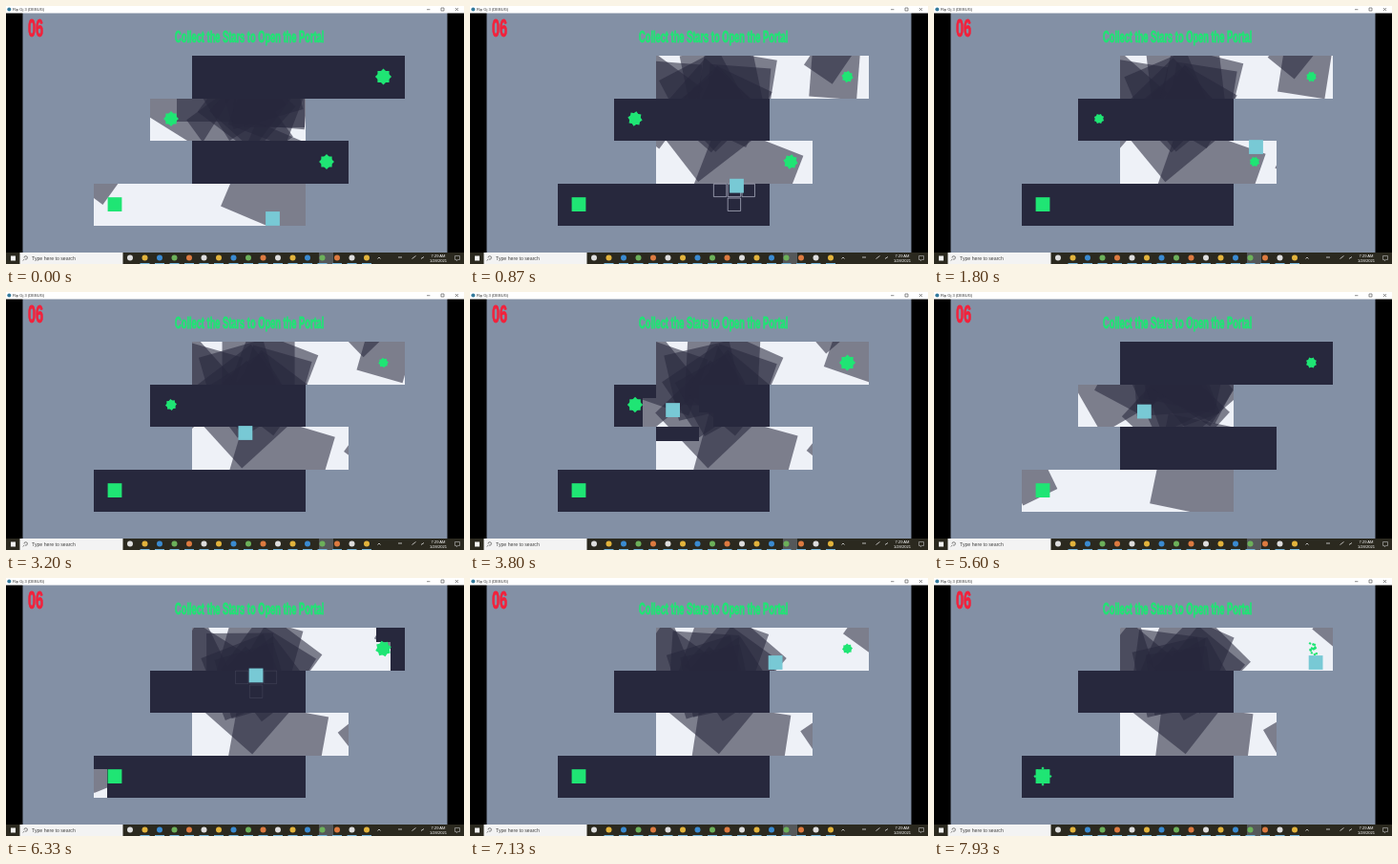
An HTML page with a canvas for the animation above (8000 ms loop, 480x270 px).

```html
<!DOCTYPE html>
<html lang="en">
<head>
<meta charset="utf-8">
<title>Portal game</title>
<style>
  html, body { margin: 0; width: 100%; height: 100%; overflow: hidden; background: #000; }
  canvas, svg { position: absolute; left: 0; top: 0; width: 480px; height: 270px; }
  text { font: 4.1px "Liberation Sans", Arial, sans-serif; }
  .hud text { font-weight: bold; stroke-width: .8px; }
</style>
</head>
<body>
<canvas id="game"></canvas>
<svg viewBox="0 0 480 270">
  <rect width="480" height="7.5" fill="#fff"/>
  <circle cx="3.3" cy="3.5" r="2" fill="#347b9c"/>
  <text x="7" y="5" fill="#333">Rip Gj 3 (DEBUG)</text>
  <path d="M441 3.7h3.4M456 2h3v3h-3zM471 2l3 3m0-3l-3 3" fill="none" stroke="#444" stroke-width=".6"/>
  <rect y="258" width="480" height="12" fill="#2b291f"/>
  <rect x="5" y="261.5" width="5" height="5" fill="#f4f4f4"/>
  <rect x="14.5" y="258" width="108" height="12" fill="#f3f3f3"/>
  <path d="M19.3 264.8l-1.5 1.7M19 263.5a1.7 1.7 0 1 1 1 1.5" fill="none" stroke="#333" stroke-width=".6"/>
  <text x="27" y="265.7" fill="#444" style="font-size:5.2px">Type here to search</text>
  <rect x="328" y="258" width="15" height="12" fill="#55585a"/>
  <g id="icons"></g>
  <path d="M389.5 264.5l1.5-1.5 1.5 1.5M411 263h4M425.5 264.500l4-3M435 264.500l3-2" fill="none" stroke="#ddd" stroke-width=".8"/>
  <g fill="#fff" text-anchor="middle">
    <text x="453" y="262.7">7:29 AM</text>
    <text x="453" y="268.3">1/28/2021</text>
  </g>
  <path d="M470.5 261.500h5v4h-2l-1.200 1.300v-1.300h-1.800z" fill="none" stroke="#aaa" stroke-width=".7"/>
  <g class="hud">
    <text fill="#f3213b" stroke="#f3213b" transform="translate(23 32) scale(.56 1)" style="font-size:26px">06</text>
    <text fill="#1fe574" stroke="#1fe574" transform="translate(177 37.500) scale(.56 1)" style="font-size:16.6px">Collect the Stars to Open the Portal</text>
  </g>
</svg>
<script>
const LOOP = 8000, CELL = 89 / 6, LEFT = 91.5, TOP = 52, WAVE_SPEED = 0.4;
const GREEN = '#1fe574', DARK = '#27283d', LIGHT = '#eef1f7', CYAN = '#78c9d5';
const PORTAL_OPENS = 7870;

const canvas = document.getElementById('game');
const ctx = canvas.getContext('2d');
const ratio = window.devicePixelRatio || 1;
canvas.width = 480 * ratio;
canvas.height = 270 * ratio;

// Taskbar buttons: plain shapes, evenly spaced
const palette = ['#ddd', '#e2b33c', '#3a8ad0', '#6cb05a', '#dc7a40'];
document.getElementById('icons').innerHTML = Array.from({ length: 17 }, (_, i) =>
  `<circle cx="${130 + i * 15.5}" cy="263.5" r="3" fill="${palette[i % 5]}"/>` +
  (i ? `<rect x="${125 + i * 15.5}" y="269" width="10" height="1" fill="#75b6dc"/>` : '')
).join('');

// Lanes: first column and number of columns, three rows each
const lanes = [[7, 15], [4, 11], [7, 11], [0, 15]];

// Backdrop: a dense heap in the middle and a few stray squares
const makeSquare = (x, y, half, angle, dx = 0, dy = 0) => ({ x, y, half, angle, dx, dy });
const squares = [
  makeSquare(288, 184, 48, 23, -0.9),
  makeSquare(245, 128, 40, 54, 1.5),
  makeSquare(376, 74, 25, 0, 7, -3),
  makeSquare(375, 62, 18, 30, 0, -6),
  makeSquare(97, 180, 20, 36, 1, 3),
  makeSquare(190, 95, 39, 32),
  makeSquare(210, 90, 31, 0),
  makeSquare(380, 164, 14, 20, -2)
];
for (let i = 0; i < 7; i++) {
  const a = i * 2.4;
  squares.push(makeSquare(263 + 18 * Math.cos(a), 95 + 13 * Math.sin(a), 32 + i % 3 * 3, i * 37));
}

// Player path: time, centre x, centre y
const path = [
  [0, 279.5, 222.5], [720, 279.5, 222.5], [1050, 279.5, 147.5], [1800, 337.5, 147.5],
  [2150, 337.5, 162], [2400, 331, 147.5], [3450, 226, 147.5], [4000, 205, 110],
  [4950, 170, 133], [5350, 206, 133], [6330, 262, 102], [6700, 277, 88.5], [LOOP, 407, 88.5]
];

function playerAt(t) {
  const next = path.findIndex(p => p[0] > t);
  const [t0, x0, y0] = path[next - 1], [t1, x1, y1] = path[next];
  const k = (t - t0) / (t1 - t0);
  return { x: x0 + (x1 - x0) * k, y: y0 + (y1 - y0) * k, rise: Math.abs(y1 - y0) / (t1 - t0) };
}

// Each flip spreads outwards from where the player is at that moment
const flips = [330, 3720, 5915].map(time => ({ time, ...playerAt(time) }));

const stars = [
  { x: 395.5, y: 74, phase: 0, taken: PORTAL_OPENS },
  { x: 173, y: 118, phase: 0.15, taken: 4550 },
  { x: 336, y: 163, phase: 0.15, taken: 2150 }
];

function fillSquare(x, y, half, degrees = 0) {
  ctx.save();
  ctx.translate(x, y);
  ctx.rotate(degrees * Math.PI / 180);
  ctx.fillRect(-half, -half, 2 * half, 2 * half);
  ctx.restore();
}

function isLit(lane, x, y, t) {
  const passed = flips.filter(f => (t - f.time) * WAVE_SPEED > Math.hypot(x - f.x, y - f.y));
  return (lane + passed.length) % 2 === 1;
}

function drawLanes(t, player) {
  const lit = new Path2D(), dark = new Path2D(), outlines = new Path2D();
  lanes.forEach(([first, count], lane) => {
    for (let row = lane * 3; row < lane * 3 + 3; row++) {
      for (let col = first; col < first + count; col++) {
        const x = LEFT + col * CELL, y = TOP + row * CELL;
        const cx = x + CELL / 2, cy = y + CELL / 2;
        const x0 = Math.round(x), y0 = Math.round(y);
        const bright = isLit(lane, cx, cy, t);
        (bright ? lit : dark).rect(x0, y0, Math.round(x + CELL) - x0, Math.round(y + CELL) - y0);
        if (!bright && Math.hypot(cx - player.x, cy - player.y) < 22) {
          outlines.rect(x + 0.7, y + 0.7, CELL - 1.4, CELL - 1.4);
        }
      }
    }
  });
  ctx.fillStyle = DARK;
  ctx.fill(dark);
  ctx.fillStyle = LIGHT;
  ctx.fill(lit);

  ctx.save();
  ctx.clip(lit);
  ctx.fillStyle = 'rgba(39,40,61,.57)';
  const s = t / 1000;
  for (const q of squares) {
    const spin = q.half < 40 ? 5 : -2;
    fillSquare(q.x + q.dx * s, q.y + q.dy * s, q.half, q.angle + spin * s);
  }
  ctx.restore();

  // Cells around a rising or falling player glow with its speed
  ctx.strokeStyle = `rgba(190,193,210,${Math.min(0.8, player.rise * 3)})`;
  ctx.stroke(outlines);
}

function drawBurst(x, y, age) {
  for (let i = 0; i < 14; i++) {
    const a = i * 2.4, d = (1 + i % 4 * 1.7) * (0.8 + age);
    fillSquare(x + d * Math.cos(a), y + d * Math.sin(a), 1.4 * (1 - age), i * 31);
  }
}

function drawStars(t) {
  for (const { x, y, phase, taken } of stars) {
    const age = (t - taken) / 260;
    if (age < 0) {
      const half = (7 + 1.6 * Math.cos((t / 1280 + phase) * 2 * Math.PI)) / Math.SQRT2;
      fillSquare(x, y, half, t * 0.012);
      fillSquare(x, y, half, t * 0.012 + 45);
    } else if (age < 1) {
      drawBurst(x + 1.5, y, age);
    }
  }
}

function drawPortal(t) {
  const x = 114, y = 207.6;
  fillSquare(x, y, 7.4);
  if (t < PORTAL_OPENS) return;
  for (let i = 0; i < 8; i++) {
    const a = i * Math.PI / 4;
    fillSquare(x + 8 * Math.cos(a), y + 8.5 * Math.sin(a), 1.1, 45);
  }
}

function draw(t) {
  const player = playerAt(t);
  ctx.setTransform(ratio, 0, 0, ratio, 0, 0);
  ctx.fillStyle = '#000';
  ctx.fillRect(0, 0, 480, 270);
  ctx.fillStyle = '#8390a5';
  ctx.fillRect(17.5, 7, 445, 251);
  drawLanes(t, player);
  ctx.fillStyle = GREEN;
  drawPortal(t);
  drawStars(t);
  ctx.fillStyle = CYAN;
  fillSquare(player.x, player.y, 7.4);
}

const start = performance.now();
function tick() {
  draw((performance.now() - start) % LOOP);
  requestAnimationFrame(tick);
}
tick();
</script>
</body>
</html>
```
